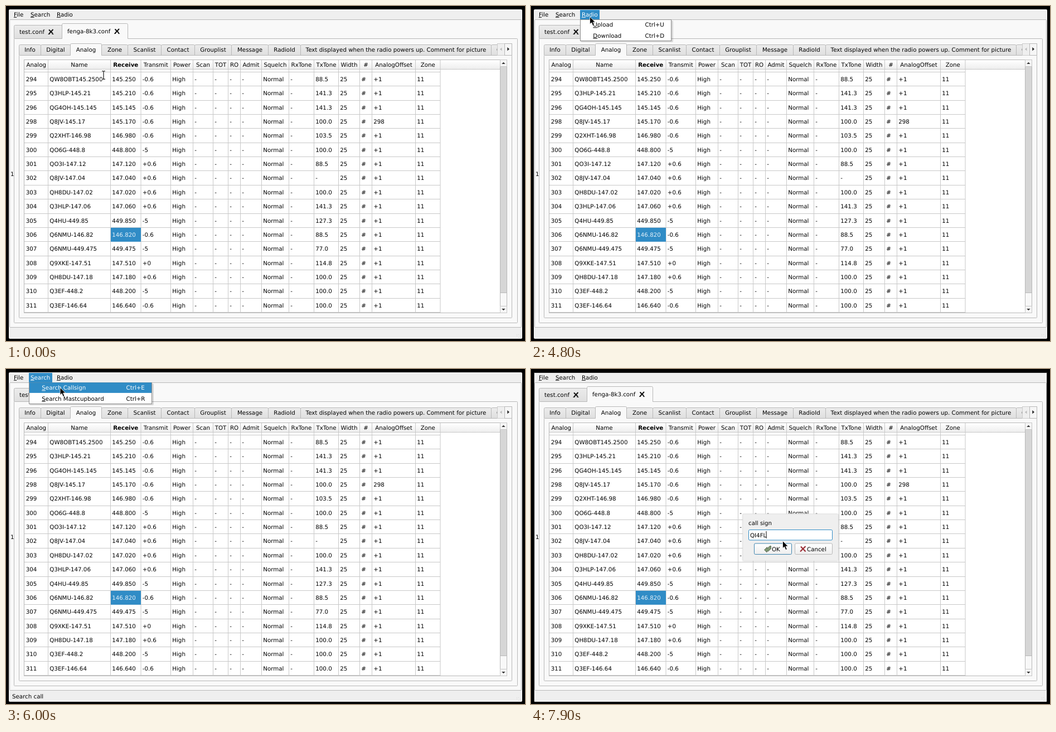
Write an HTML page that moves like this. It is 931 px wide and 601 px high and loops after 8 s.

```html
<!DOCTYPE html>
<html lang="en">
<head>
<meta charset="utf-8">
<title>Radio channel editor</title>
<style>
html, body { margin: 0; width: 100%; height: 100%; overflow: hidden; background: #000; }
svg { display: block; }
text { font: 10.27px "DejaVu Sans", sans-serif; text-rendering: geometricPrecision; white-space: pre; }
.bold { font-weight: bold; }
.mid { text-anchor: middle; }
.u { text-decoration: underline; }
</style>
</head>
<body>
<svg width="931" height="601" viewBox="0 0 931 601">
  <defs>
    <linearGradient id="head" x2="0" y2="1"><stop stop-color="#fff"/><stop offset="1" stop-color="#eee"/></linearGradient>
    <linearGradient id="tab" x2="0" y2="1"><stop stop-color="#ececec"/><stop offset="1" stop-color="#dfdfdf"/></linearGradient>
    <clipPath id="strip"><path d="M23 60H881V95H23z"/></clipPath>
  </defs>
  <g id="window"></g>
  <g id="overlay"></g>
</svg>
<script>
const BLUE = '#308cc6', EDGE = '#b8b8b8', GRID = '#c8c8c8', PANE = '#f9f9f9', BASE = '#efefef';
const COLUMNS = [33, 75.5, 187.5, 242, 295.5, 335.5, 371.5, 398.5, 420.5, 458.5, 507.5, 552.5, 596.5, 634.5, 656.5, 734.5, 779];
const HEADERS = 'Analog Name Receive Transmit Power Scan TOT RO Admit Squelch RxTone TxTone Width # AnalogOffset Zone'.split(' ');
const ROW_TOP = 118.3, ROW_STEP = 25.375;
const ROWS = `294 QW8OBT145.2500 -0.6 88.5
295 Q3HLP-145.21 -0.6 141.3
296 QG4OH-145.145 -0.6 141.3
298 Q8JV-145.17 -0.6 100.0 298
299 Q2XHT-146.98 -0.6 103.5
300 QO6G-448.8 -5 100.0
301 QO3I-147.12 +0.6 88.5
302 Q8JV-147.04 +0.6 -
303 QH8DU-147.02 +0.6 100.0
304 Q3HLP-147.06 +0.6 141.3
305 Q4HU-449.85 -5 127.3
306 Q6NMU-146.82 -0.6 88.5
307 Q6NMU-449.475 -5 77.0
308 Q9XKE-147.51 +0 114.8
309 QH8DU-147.18 +0.6 100.0
310 Q3EF-448.2 -5 100.0
311 Q3EF-146.64 -0.6 100.0`.split('\n').map(line => line.split(' '));

// y is the middle of the capitals
const text = (x, y, content, cls = '', fill = '#000') =>
  `<text x="${x}" y="${y + 3.75}" class="${cls}" fill="${fill}">${content}</text>`;
const rect = (x1, y1, x2, y2, fill, stroke = 'none', r = 0) =>
  `<rect x="${x1}" y="${y1}" width="${x2 - x1}" height="${y2 - y1}" fill="${fill}" stroke="${stroke}" rx="${r}"/>`;
const path = (d, fill, stroke = 'none', width = 1) =>
  `<path d="${d}" fill="${fill}" stroke="${stroke}" stroke-width="${width}"/>`;
const mnemonic = label => `<tspan class="u">${label[0]}</tspan>${label.slice(1)}`;

function tabShape(x1, x2, top, bottom, active) {
  const d = `M${x1} ${bottom}V${top + 2}q0 -2 2 -2H${x2 - 2}q2 0 2 2V${bottom}`;
  return path(d, active ? PANE : 'url(#tab)', EDGE) +
    (active ? path(`M${x1 + .5} ${bottom}H${x2 - .5}`, 'none', PANE, 1.6) : '');
}

const closeIcon = (x, y) =>
  path(`M${x - 3.5} ${y + 4}L${x + 4} ${y - 4}M${x - 3.5} ${y - 3.5}L${x + 3.5} ${y + 3.5}`, 'none', '#111', 1.9) +
  path(`M${x - 5} ${y + 4.5}h3M${x + 2} ${y + 4.5}h3`, 'none', '#111');

function chrome() {
  let s = rect(5, 6, 926, 597, BASE, 'none', 2) + rect(6.5, 24.5, 924.5, 576.5, PANE, EDGE, 1);
  s += text(14, 15, mnemonic('File')) + text(44, 15, mnemonic('Search')) + text(91, 15, mnemonic('Radio'));
  s += text(8, 301, '1');
  s += tabShape(14.5, 100.5, 34.5, 58.5, false) + rect(14.5, 58.5, 917.5, 568.5, PANE, EDGE, 1);
  s += tabShape(100.5, 218.5, 31.5, 58.5, true);
  s += text(24, 46, 'test.conf') + closeIcon(80.5, 46) + text(110, 45, 'fenga-8k3.conf') + closeIcon(199, 45);
  for (let i = 0; i < 6; i++)
    s += rect(922 - i % 3 * 3, 594 - (i >> 1) * 2.5, 923 - i % 3 * 3, 595 - (i >> 1) * 2.5, '#d4d4d4');
  return s;
}

function innerTabs() {
  const labels = ['Info', 'Digital', 'Analog', 'Zone', 'Scanlist', 'Contact', 'Grouplist', 'Message', 'RadioId',
    'Text displayed when the radio powers up. Comment for picture'];
  const edges = [23.5, 62.5, 115.5, 171.5, 218.5, 278.5, 338.5, 404.5, 470.5, 528.5, 870.5];
  const draw = i => tabShape(edges[i], edges[i + 1], i === 2 ? 67.5 : 69.5, 88.5, i === 2) +
    text((edges[i] + edges[i + 1]) / 2, 78, labels[i], 'mid');
  let s = '<g clip-path="url(#strip)">';
  labels.forEach((_, i) => { if (i !== 2) s += draw(i); });
  s += tabShape(870.5, 940, 69.5, 88.5, false) + text(880, 78, 'Comment') + '</g>';
  s += rect(23.5, 88.5, 907.5, 559.5, PANE, EDGE, 1) + draw(2);
  s += rect(881.5, 67.5, 894.5, 88.5, BASE, '#ccc') + rect(894.5, 67.5, 907.5, 88.5, '#f6f6f6', EDGE);
  return s + path('M889.5 74.5v6l-3.5 -3z', '#bbb') + path('M899.3 74v6.4l3.7 -3.2z', '#222');
}

function table() {
  let s = rect(32.5, 96.5, 898.5, 550.5, '#fff', EDGE) + rect(33, 97, 886, 113, 'url(#head)');
  const lines = [`M33 113.5H886M33 118.5H779`];
  COLUMNS.slice(1).forEach(x => lines.push(`M${x} 97V550`));
  ROWS.forEach((_, i) => lines.push(`M33 ${Math.floor(ROW_TOP + (i + 1) * ROW_STEP) + .5}H779`));
  s += path(lines.join(''), 'none', GRID);
  HEADERS.forEach((h, i) =>
    s += text((COLUMNS[i] + COLUMNS[i + 1]) / 2, 105, h, i === 2 ? 'mid bold' : 'mid'));
  ROWS.forEach(([id, name, shift, tone, offset = '+1'], i) => {
    const y = 131 + i * ROW_STEP, chosen = id === '306';
    const freq = (+name.match(/\d{3}\.\d+$/)[0]).toFixed(3);
    const cells = [id, name, freq, shift, 'High', '-', '-', '-', '-', 'Normal', '-', tone, '25', '#', offset, '11'];
    if (chosen) s += rect(188, y - 12.3, 242, y + 12.7, BLUE);
    cells.forEach((c, k) =>
      s += text(COLUMNS[k] + 2.8, y, c, '', chosen && k === 2 ? '#e4f1fa' : '#000'));
  });
  s += rect(886.5, 96.5, 898.5, 550.5, '#d6d6d6', EDGE) + rect(886.5, 96.5, 898.5, 108.5, '#f6f6f6', GRID);
  s += rect(886.5, 514.5, 898.5, 538.5, '#f8f8f8', EDGE) + rect(886.5, 538.5, 898.5, 550.5, '#f6f6f6', GRID);
  return s + path('M889.2 104h6.4l-3.2 -3.3z', '#333') + path('M889.2 543h6.4l-3.2 3.3z', '#333');
}

function menu({ title, x1, x2, titleEnd, keyX, items }, hover) {
  let s = rect(x1 + 1, 26, x2 + 3, 65, '#0002', 'none', 2) + rect(x1, 7, titleEnd, 24, BLUE);
  s += text(x1 + 3, 15, mnemonic(title), '', '#fff') + rect(x1 + .5, 24.5, x2 - .5, 62.5, '#fff', '#8c8c8c');
  items.forEach(([label, key], i) => {
    const y = 33.5 + i * 19.4, on = i === hover, fill = on ? '#fff' : '#000';
    if (on) s += rect(x1 + 1, y - 9.2, x2 - 1, y + 9.4, BLUE);
    s += text(x1 + 23.3, y, mnemonic(label), '', fill) + text(keyX, y, key, '', fill);
  });
  return s;
}

const radioMenu = { title: 'Radio', x1: 88, x2: 252, titleEnd: 123, keyX: 204.5,
  items: [['Upload', 'Ctrl+U'], ['Download', 'Ctrl+D']] };
const searchMenu = { title: 'Search', x1: 41, x2: 262, titleEnd: 83, keyX: 215.5,
  items: [['Search Callsign', 'Ctrl+E'], ['Search Mastcupboard', 'Ctrl+R']] };

function dialog(t) {
  const selected = t < 7400, value = t < 7900 ? 'QI4FLF' : 'QI4FL', caret = t < 7900 ? 428 : 422;
  let s = path('M5.5 597V6.5H925.5V597', 'none', '#222');
  s += rect(378, 259, 553, 346, '#0000000c', 'none', 4) + rect(380, 260, 551, 344, BASE, '#e2e2e2', 2);
  s += text(390, 276, 'call sign') + rect(390.5, 288.5, 540.5, 307, '#fff', t < 6500 ? '#b0b0b0' : BLUE, 2);
  if (selected) s += rect(393, 291, 428, 304, BLUE);
  s += text(393, 297.8, value, '', selected ? '#fff' : '#000') + rect(caret - .5, 291, caret + .5, 304, '#000');
  s += rect(400.5, 313, 467.5, 332.5, 'url(#head)', '#4186b0', 2) + rect(473.5, 313, 540.5, 332.5, 'url(#head)', EDGE, 2);
  s += path('M418.5 324.5l5 -5v2.5l5 -4.5h2v5l-5 4.5h-2.500v2z', '#7f9873', '#4c5a48', .8);
  s += path('M484 318.500l8.500 9M492.500 318l-9.500 9.500', 'none', '#9c3038', 2.2);
  return s + text(432, 322.8, 'OK') + text(495, 322.8, 'Cancel');
}

// first step, last step, x, y, arrow pointer
const MOVES = [
  [0, 0, 175, 124], [100, 100, 258.5, 191], [300, 500, 552, 398], [700, 900, 162, 160],
  [1100, 1300, 250, 135], [1600, 1700, 249, 140], [2200, 2500, 340, 155],
  [3900, 3900, 115.7, 14, 1], [4200, 4300, 101, 14, 1], [4800, 5100, 130.5, 48.5, 1],
  [5300, 5300, 108, 20, 1], [5400, 5400, 71.2, 20, 1], [5500, 5500, 72, 20, 1], [5700, 6100, 100, 35, 1],
  [6400, 6400, 491.5, 313.5], [6500, 6900, 470, 309, 1], [7000, 7200, 452, 299], [7600, 7600, 451.5, 308.5, 1]
];

function pointerAt(t) {
  let x = 0, y = 0, arrow = 0;
  for (const [first, last, toX, toY, kind = 0] of MOVES) {
    if (t < first) break;
    const p = Math.min(1, (t - first + 100) / (last - first + 100)), e = p * p * (3 - 2 * p);
    x += (toX - x) * e;
    y += (toY - y) * e;
    arrow = kind;
  }
  return { x, y, arrow };
}

function pointer({ x, y, arrow }) {
  const beam = 'M-3 -7.200H-1Q0 -7.200 0 -6V6Q0 7.200 -1 7.200H-3M3 -7.200H1Q0 -7.200 0 -6M0 6Q0 7.200 1 7.200H3';
  const shape = arrow
    ? path('M0 0V13.200L3 10.400L5.400 16L7.800 15L5.500 9.600H9.700Z', '#000', '#fff', .8)
    : path(beam, 'none', '#fff', 2.2) + path(beam, 'none', '#000', 1.1);
  return `<g transform="translate(${x} ${y})">${shape}</g>`;
}

function overlayAt(t) {
  const p = pointerAt(t), hover = p.y < 25 ? -1 : p.y < 43 ? 0 : 1;
  let s = '', status = '';
  if (t >= 4600 && t < 5400) {
    s = menu(radioMenu, hover);
    status = ['', 'Upload file', 'Download file'][hover + 1];
  } else if (t >= 5400 && t < 6400) {
    s = menu(searchMenu, hover);
    status = hover === 0 ? 'Search call' : '';
  } else if (t >= 6400) {
    s = dialog(t);
  }
  return s + text(11, 587, status) + pointer(p);
}

document.getElementById('window').innerHTML = chrome() + innerTabs() + table();
const overlay = document.getElementById('overlay');
let shown = -1;
function tick() {
  const t = Math.floor(performance.now() % 8000 / 100) * 100;
  if (t !== shown) overlay.innerHTML = overlayAt(shown = t);
  requestAnimationFrame(tick);
}
tick();
</script>
</body>
</html>
```
